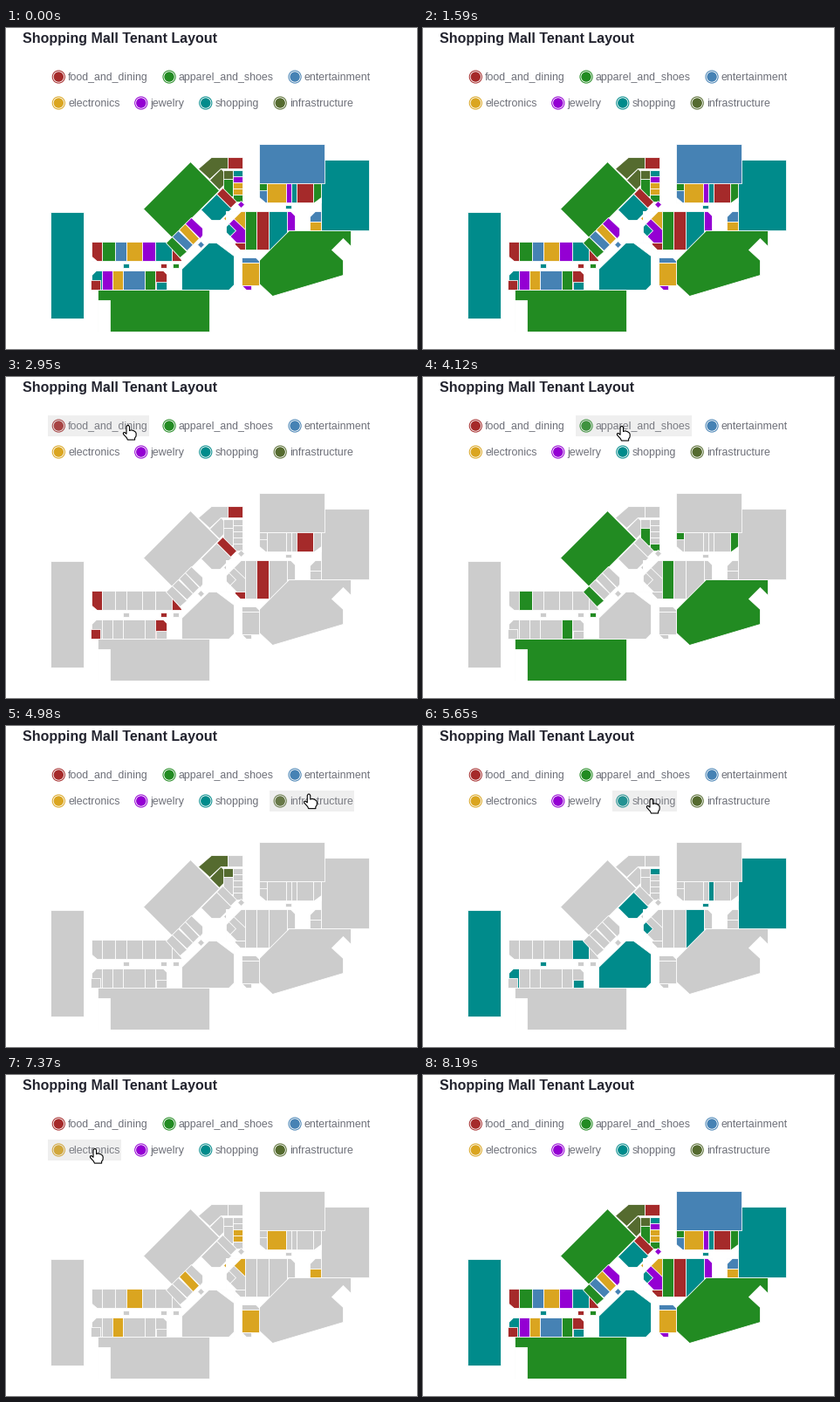
A matplotlib script that plays this animation: 471x368 px, repeating every 9.09 s.

```python
import numpy as np
import matplotlib.pyplot as plt
from matplotlib.animation import FuncAnimation
from matplotlib.collections import PolyCollection
from matplotlib.patches import Circle, Polygon, Rectangle

W, H, DPI = 471, 368, 64
STEP, LOOP = 30, 9090
PT = 72 / DPI  # points per pixel
FONT = "Liberation Sans"
INK, MUTED, GRAY, FLOOR = "#23242f", "#6e7079", "#cccccc", "white"

CATEGORIES = [("food_and_dining", "#a52a2a"), ("apparel_and_shoes", "#228b22"),
              ("entertainment", "#4682b4"), ("electronics", "#daa520"),
              ("jewelry", "#9400d3"), ("shopping", "#008b8b"),
              ("infrastructure", "#556b2f")]
KINDS = "faetjsi"  # one letter per category; "." is open floor
COLORS = dict(zip(KINDS, (c for _, c in CATEGORIES)))

fig = plt.figure(figsize=(W / DPI, H / DPI), dpi=DPI, facecolor="white")
ax = fig.add_axes([0, 0, 1, 1])
ax.set(xlim=(0, W), ylim=(H, 0))
ax.axis("off")


def label(x, y, s, px, color, z=2, **kw):
    return ax.text(x, y, s, fontsize=px * PT, color=color, family=FONT,
                   va="baseline", zorder=z, **kw)


# ---- floor plan, painted in order ----
shops, kinds = [], []


def poly(kind, *pts):
    shops.append(np.floor(pts) + .5)  # walls run along pixel centres
    kinds.append(kind)


def box(kind, x, y, w, h):
    poly(kind, (x, y), (x + w, y), (x + w, y + h), (x, y + h))


def wedge(kind, x, y, dx, dy):
    """Right triangle with its square corner at (x, y)."""
    poly(kind, (x, y), (x + dx, y), (x, y + dy))


def tilt(kind, x, y, a, b):
    """Rectangle turned 45 degrees: top corner, right leg, left leg."""
    poly(kind, (x, y), (x + a, y + a), (x + a - b, y + a + b), (x - b, y + b))


def row(x, y, h, units, sizes, module=3.08):
    for kind, n in zip(units, sizes):
        box(kind, x, y, int(n) * module, h)
        x += int(n) * module


# west wing
box("s", 51, 211, 38, 122)
box("a", 105, 300, 128, 48)
box(".", 105, 312, 14, 38)
row(98, 245, 22, "faetjs", "454656")
wedge(".", 97, 267, 7, -6)
wedge("f", 190, 267, 12, -15)
row(98, 278, 22, "sjteaf", "444844")
box("f", 97, 289, 11, 11)
box("s", 172, 291, 12, 9)
wedge(".", 97, 278, 6, 6)
wedge(".", 184, 278, -4, 4)
for kind, x in zip("sfa", (134, 177, 191)):
    box(kind, x, 270, 7, 5)

# central hall
box("s", 201, 246, 60, 54)
wedge(".", 201, 246, 31, 30)
wedge(".", 261, 246, -20, 15)
wedge(".", 261, 300, -6, -6)

# diagonal wing
tilt("a", 211, 153, 33, 54)
for k, kind in enumerate("aetj"):
    tilt(kind, 190.5 + 7.4 * k, 239.5 - 7.4 * k, 16.6, 7.2)
box(".", 225, 222, 6, 18)

# north corner
poly("i", (220, 161), (235, 148), (254, 148), (254, 161), (246, 161), (233, 173))
tilt("i", 246, 161, 11, 13)
box("f", 254, 148, 17, 13)
box("i", 249, 163, 11, 10)
box("a", 249, 173, 11, 20)
for k, kind in enumerate("sjtta"):
    box(kind, 260, 163 + 7.2 * k, 11, 7.2)
tilt("f", 248, 183, 16.5, 7)
tilt("s", 241, 190, 17, 18)
box(".", 234, 220, 11, 6)

# kiosks along the diagonal
for kind, x in zip("jte", (269, 253, 223)):
    tilt(kind, x, W - 4 - x, 4, 4)

# centre block
box("j", 252, 210, 22, 36)
wedge("t", 274, 210, -22, 21)
tilt("s", 255, 224, 8, 8)
box(".", 246, 222, 6, 20)
wedge(".", 252, 210, 17, 17)
wedge(".", 252, 246, 12, -12)
box("f", 262, 246, 12, 8)
wedge(".", 262, 254, 6, -6)
row(274, 210, 44, "afs", "223", 6.9)
box("j", 322, 210, 9, 22)
wedge(".", 331, 210, -5, 5)
poly("a", (290, 266), (324, 232), (395, 232), (395, 250), (386, 241), (373, 254),
     (386, 266), (386, 283), (305, 307), (290, 293))
box("e", 270, 263, 20, 6)
box("t", 270, 269, 20, 26)
box("j", 270, 295, 11, 5)
wedge(".", 290, 263, -4, 4)
wedge(".", 270, 300, 5, -5)

# east wing
box("s", 361, 151, 55, 81)
box("e", 290, 133, 75, 45)
row(290.5, 178, 22, "atjsfa", "372263")
box("e", 290, 186, 9, 14)
wedge(".", 290, 200, 7, -6)
wedge(".", 361, 200, -8, -6)
box("s", 320, 203, 7, 4)
box("e", 348, 210, 13, 12)
wedge(".", 348, 210, 6, 6)
box("t", 348, 222, 13, 10)

plan = PolyCollection(shops, edgecolors="white", linewidths=.8 * PT, zorder=1)
plan.set_snap(False)
ax.add_collection(plan)

# ---- title and legend ----
label(19, 17, "Shopping Mall Tenant Layout", 16, INK, weight="bold")

LEFT, GAP = 48, 11
legend = []  # kind, left, right, middle line
left, mid = LEFT, 56
for kind, (name, color) in zip(KINDS, CATEGORIES):
    if kind == "t":
        left, mid = LEFT, 86
    ax.add_patch(Circle((left + 12.3, mid), 7.1, fc="white", ec=color, lw=PT, zorder=2))
    ax.add_patch(Circle((left + 12.3, mid), 5.7, fc=color, ec="none", zorder=2))
    text = label(left + 23, mid + 4.3, name, 12.4, MUTED)
    right = left + 24 + text.get_window_extent().width
    legend.append((kind, left, right, mid))
    left = right + GAP

veil = ax.add_patch(Rectangle((0, 0), 1, 24, fc="#b0b0b0", ec="none", alpha=.2, zorder=3))

# ---- tooltip ----
TIP_NAME = "Velmo Cinema"
shadow = Rectangle((0, 0), 125, 68, fc="black", ec="none", zorder=4)
panel = Rectangle((0, 0), 125, 68, fc="white", ec="none", zorder=5)
dot = Circle((0, 0), 4, fc=COLORS["e"], ec="none", zorder=6)
for part in (shadow, panel, dot):
    ax.add_patch(part)
tip_head = label(0, 0, TIP_NAME, 14, INK, 6, weight="bold")
tip_text = label(0, 0, TIP_NAME, 14, MUTED, 6)


def draw_tip(t):
    alpha = np.interp(t, [2060, 2200, 2400, 2560], [0, 1, 1, 0])
    x = np.interp(t, [2060, 2250, 2400], [376, 359, 346])
    y = 154.5
    panel.set_xy((x, y))
    shadow.set_xy((x + 1, y + 6))
    dot.center = (x + 14.5, y + 48)
    tip_head.set_position((x + 10.5, y + 25.5))
    tip_text.set_position((x + 24.5, y + 52.5))
    for part in (panel, dot, tip_head, tip_text):
        part.set_alpha(alpha)
    shadow.set_alpha(.05 * alpha)


# ---- pointer ----
ARROW = np.array([(0, 0), (0, 15), (3.5, 11.8), (6, 17.6), (8.5, 16.5), (6.1, 10.9), (10.8, 10.8)])
HAND = np.array([(-2, 1), (-1, -.5), (.5, -.5), (1.5, 1), (1.5, 5.5), (3.5, 4.8), (6.3, 5.6),
                 (8.6, 7.2), (9.2, 9), (9, 12), (7.6, 14), (7.6, 16), (-.6, 16), (-1.6, 13.8),
                 (-5.5, 9.5), (-5.6, 8), (-4.2, 7.4), (-2, 9.2)])
arrow = Polygon(ARROW, fc="black", ec="white", lw=PT, joinstyle="round", zorder=8)
hand = Polygon(HAND, fc="white", ec="black", lw=1.1 * PT, joinstyle="round", zorder=8)
ax.add_patch(arrow)
ax.add_patch(hand)

# leave, arrive, stop
STOPS = [(0, 1530, (474, 131)), (1530, 2250, (348, 142)), (2250, 2940, (140, 56)),
         (3490, 3850, (224, 57)), (4030, 4590, (349, 57)), (4860, 5040, (347, 82)),
         (5310, 5650, (262, 84)), (5940, 6280, (187, 81)), (6610, 6830, (102, 85)),
         (7340, 7630, (109, 122)), (7870, 8190, (2, 385))]


def ease(u):
    u = min(max(u, 0), 1)
    return u ** 3 * (10 - 15 * u + 6 * u * u)


def pointer(t):
    pos = np.array(STOPS[0][2], float)
    for t0, t1, stop in STOPS[1:]:
        pos += (stop - pos) * ease((t - t0) / (t1 - t0))
    return pos


def hovered(pos):
    for item in legend:
        _, left, right, mid = item
        if left <= pos[0] <= right and abs(pos[1] - mid) <= 12:
            return item
    return None


def shade(kind, active):
    if kind == ".":
        return FLOOR
    return COLORS[kind] if active in (None, kind) else GRAY


def draw(i):
    t = i * STEP + 10
    pos = pointer(t)
    item = hovered(pos)
    active = item[0] if item else None
    plan.set_facecolor([shade(k, active) for k in kinds])

    veil.set_visible(item is not None)
    if item:
        _, left, right, mid = item
        veil.set_xy((left, mid - 12))
        veil.set_width(right - left)

    on_stage = STOPS[1][0] <= t < STOPS[-1][1]
    arrow.set_visible(on_stage and item is None)
    hand.set_visible(item is not None)
    arrow.set_xy(ARROW + pos)
    hand.set_xy(HAND + pos)
    draw_tip(t)
    return []


anim = FuncAnimation(fig, draw, frames=LOOP // STEP, interval=STEP, repeat=True,
                     repeat_delay=0, blit=False)
plt.show()
```
